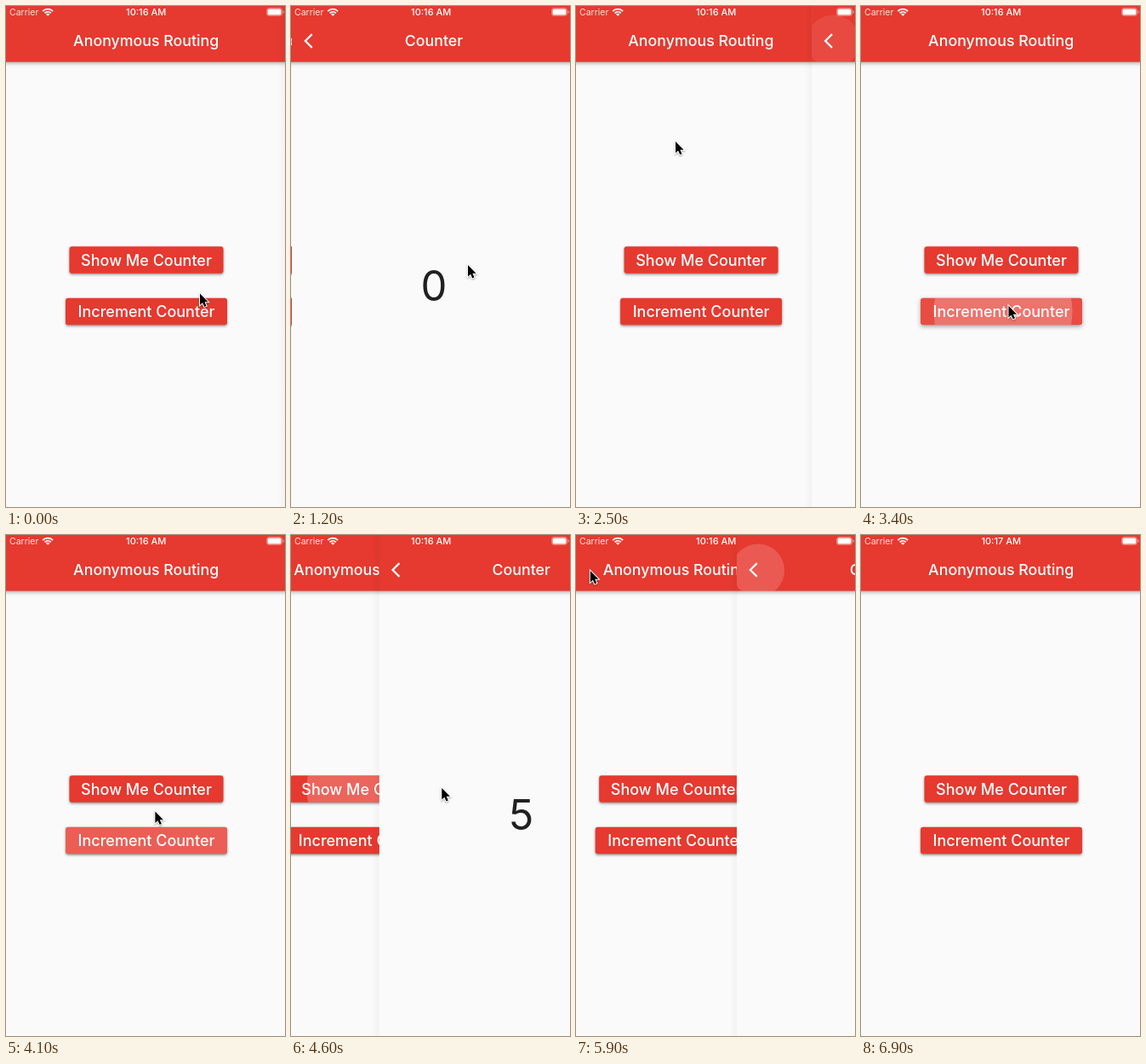
Animation of 328x588 px, one loop 7300 ms. Source, as an HTML page with a canvas:

```html
<!DOCTYPE html>
<html lang="en">
<head>
<meta charset="utf-8">
<title>Anonymous Routing</title>
<style>
  html, body { margin: 0; height: 100%; overflow: hidden; background: #fafafa; }
  canvas { display: block; width: 328px; height: 588px; }
</style>
</head>
<body>
<canvas id="stage" width="328" height="588"></canvas>
<script>
const W = 328, H = 588, LOOP = 7300, STEP = 100, SLIDE = 400;
const RED = '#e6392f', PAPER = '#fafafa', FONT = 'Inter, Roboto, sans-serif';
const ctx = document.getElementById('stage').getContext('2d');
const clamp = v => Math.max(0, Math.min(1, v));
const white = a => `rgba(255,255,255,${a})`;

// Pointer tip: time, x, y
const pointer = [
  [0, 228, 337.5], [200, 228, 346], [700, 204, 303], [900, 208, 304],
  [1400, 208, 304], [1600, 206, 320], [2100, 20, 42], [2230, 21, 42],
  [2500, 117, 159], [3000, 173.5, 352], [3850, 173.5, 352], [4350, 177.3, 297],
  [4700, 177.3, 297], [5400, 50, 80], [5700, 16.8, 42], [5950, 16.8, 42], [6600, 334, 200]
];
const showTaps = [800, 4471];
const addTaps = [3050, 3250, 3450, 3650, 3850];
const backTaps = [2150, 5800];

// cubic-bezier(.35, .91, .33, .97)
function ease(p) {
  p = clamp(p);
  const curve = (a, b, s) => 3 * a * s * (1 - s) ** 2 + 3 * b * s * s * (1 - s) + s ** 3;
  let lo = 0, hi = 1;
  for (let i = 0; i < 24; i++) {
    const mid = (lo + hi) / 2;
    if (curve(.35, .33, mid) < p) lo = mid; else hi = mid;
  }
  return p === 1 ? 1 : curve(.91, .97, lo);
}

// Left edge of the counter page
function pageX(t) {
  const slide = start => ease((t - start) / SLIDE);
  if (t < 1200) return W;
  if (t < 1300) return 1;
  if (t < 3500) return W * slide(2342);
  if (t < 5500) return W * (1 - slide(4488));
  return W * slide(5809);
}

function text(str, x, y, size, weight, color = '#fff', align = 'center') {
  ctx.font = `${weight} ${size}px ${FONT}`;
  ctx.textAlign = align;
  ctx.fillStyle = color;
  ctx.fillText(str, x, y);
}

function shadow(alpha, blur, dy) {
  ctx.shadowColor = `rgba(0,0,0,${alpha})`;
  ctx.shadowBlur = blur;
  ctx.shadowOffsetY = dy;
}

function disc(x, y, r, color) {
  ctx.fillStyle = color;
  ctx.beginPath();
  ctx.arc(x, y, r, 0, 7);
  ctx.fill();
}

function page(title, cx) {
  ctx.fillStyle = PAPER;
  ctx.fillRect(0, 0, W + 120, H);
  ctx.save();
  shadow(.42, 5, 1.5);
  ctx.fillStyle = RED;
  ctx.fillRect(-10, -10, W + 140, 75.6);
  ctx.restore();
  text(title, cx, 47, 17.8, 500);
}

function button(label, y, w, taps, t, held) {
  const x = 165 - w / 2, h = 31.5;
  ctx.save();
  shadow(held ? .35 : .42, held ? 5 : 3, held ? 2 : 1.5);
  ctx.fillStyle = RED;
  ctx.beginPath();
  ctx.roundRect(x, y, w, h, 3);
  ctx.fill();
  ctx.restore();

  ctx.save();
  ctx.clip();
  if (held) {
    ctx.fillStyle = white(.06);
    ctx.fillRect(x, y, w, h);
  }
  for (const tap of taps) {
    const age = t - tap;
    if (age > 0 && age < 375)
      disc(167, y + h / 2, Math.min(100, 20 + .41 * age), white(.22 * clamp((375 - age) / 150)));
  }
  ctx.restore();
  text(label, 165, y + 22.2, 18, 500);
}

function homePage(t) {
  page('Anonymous Routing', 164.7);
  button('Show Me Counter', 282.3, 181, showTaps, t, false);
  button('Increment Counter', 342.7, 190, addTaps, t, t > 3050 && t < 4000);
}

function counterPage(t) {
  page('Counter', 167);
  ctx.save();
  ctx.beginPath();
  ctx.rect(0, 0, W, 65.6);
  ctx.clip();
  for (const tap of backTaps) {
    const age = t - tap;
    if (age > 0 && age < 500)
      disc(25, 41.5, 31, white(.17 * clamp(age / 50) * clamp((500 - age) / 300)));
  }
  ctx.translate(14.3, 30.5);
  ctx.scale(.875, .875);
  ctx.fillStyle = '#fff';
  ctx.fill(new Path2D('M11.67 3.87 9.9 2.1 0 12 9.9 21.9 11.67 20.13 3.54 12Z'));
  ctx.restore();
  text(t < 3000 ? '0' : '5', 167, 346.4, 49, 400, '#212121');
}

function statusBar(t) {
  text('Carrier', 4, 11, 10.5, 400, white(.85), 'left');
  text(t < 6700 ? '10:16 AM' : '10:17 AM', 164.7, 11, 11, 500);

  ctx.strokeStyle = '#fff';
  for (const [r, width] of [[8.2, 1.8], [5, 1.8], [1.5, 3]]) {
    ctx.lineWidth = width;
    ctx.beginPath();
    ctx.arc(49.2, 11.8, r, -Math.PI * .76, -Math.PI * .24);
    ctx.stroke();
  }

  ctx.lineWidth = 1;
  ctx.strokeStyle = white(.35);
  ctx.beginPath();
  ctx.roundRect(306.5, 2.5, 18, 9, 2.5);
  ctx.stroke();
  ctx.fillStyle = '#fff';
  ctx.beginPath();
  ctx.roundRect(307.5, 3.4, 16, 7.2, 1.5);
  ctx.fill();
  ctx.fillStyle = white(.5);
  ctx.fillRect(325.5, 5.5, 1.2, 3);
}

function drawPointer(t) {
  const i = pointer.findIndex(k => k[0] > t);
  if (i < 0) return;
  const [t0, x0, y0] = pointer[i - 1], [t1, x1, y1] = pointer[i];
  const p = (t - t0) / (t1 - t0);
  ctx.save();
  ctx.translate(x0 + (x1 - x0) * p, y0 + (y1 - y0) * p);
  const arrow = new Path2D('M0 0V13.5L3.1 10.8 5.3 15.5 7.5 14.5 5.4 9.8H9.6Z');
  ctx.save();
  shadow(.35, 2, 1);
  ctx.strokeStyle = '#fff';
  ctx.lineWidth = 2;
  ctx.stroke(arrow);
  ctx.restore();
  ctx.fillStyle = '#000';
  ctx.fill(arrow);
  ctx.restore();
}

function draw(t) {
  const x = pageX(t);
  ctx.save();
  if (x < W) ctx.translate((x - 331) / 3, 0);
  homePage(t);
  ctx.restore();

  if (x < W || t < 1200) {
    const edge = ctx.createLinearGradient(x - 9, 0, x, 0);
    edge.addColorStop(0, 'rgba(0,0,0,0)');
    edge.addColorStop(1, 'rgba(0,0,0,.03)');
    ctx.fillStyle = edge;
    ctx.fillRect(x - 9, 0, 9, H);
  }

  ctx.save();
  ctx.beginPath();
  ctx.rect(x, 0, W, H);
  ctx.clip();
  ctx.translate(x, 0);
  counterPage(t);
  ctx.restore();

  statusBar(t);
  drawPointer(t);
}

const start = performance.now();
function tick() {
  let t = Math.floor((performance.now() - start) % LOOP / STEP) * STEP;
  if (t > 900 && t < 1200) t = 900; // the screen stalls before the first page opens
  draw(t);
  requestAnimationFrame(tick);
}
tick();
</script>
</body>
</html>
```
